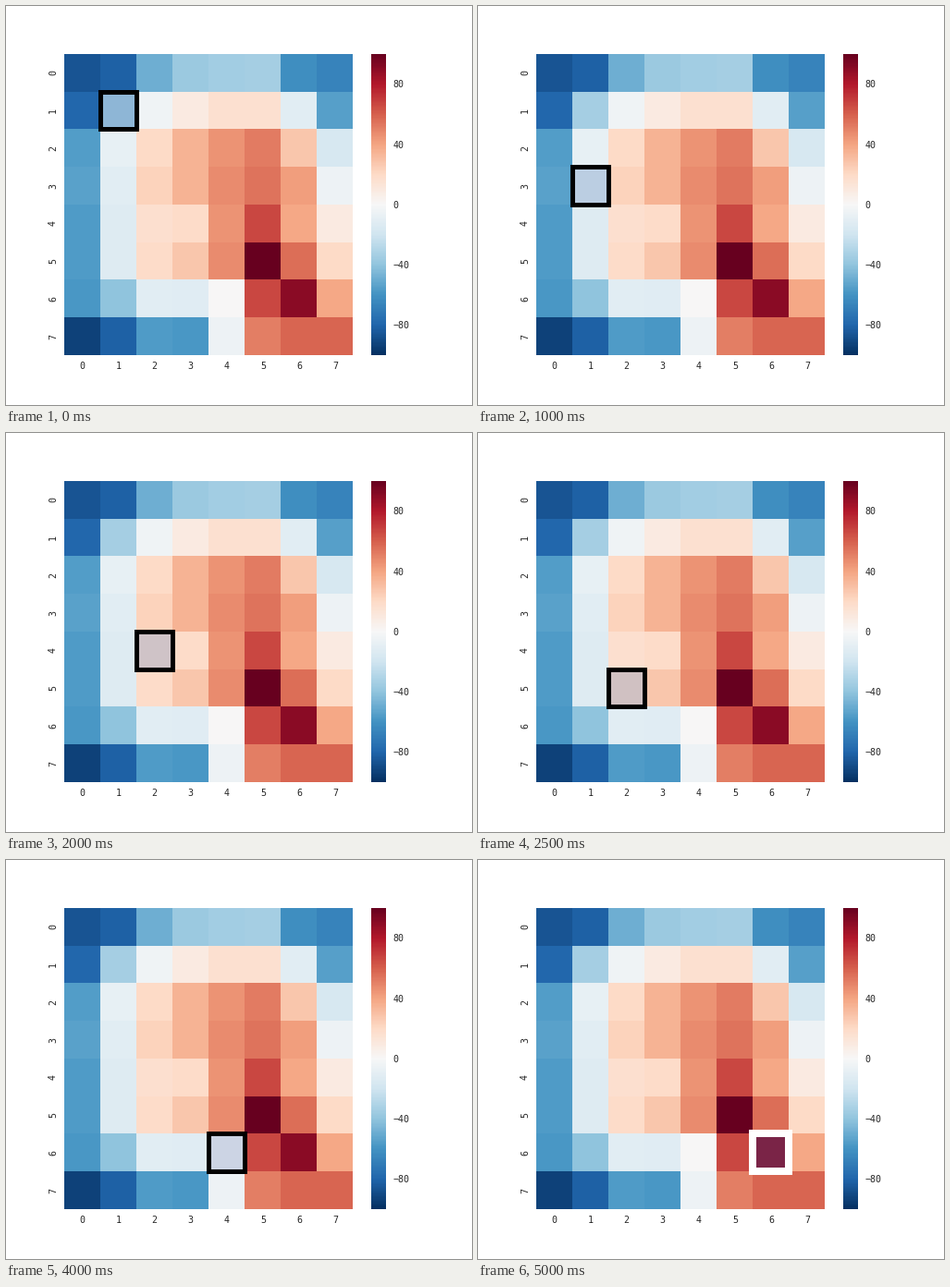
A matplotlib script that plays this animation: 504x432 px, repeating every 5500 ms.

```python
import matplotlib.pyplot as plt
import numpy as np
from matplotlib.animation import FuncAnimation
from matplotlib.patches import Rectangle

plt.rcParams.update({
    "font.family": "DejaVu Sans Mono",
    "font.size": 10,
    "text.color": "0.15",
    "xtick.color": "0.15",
    "ytick.color": "0.15",
})

GRID = np.array([
    [-86, -82, -49, -37, -35, -34, -62, -67],
    [-79, -34, -4, 9, 16, 16, -11, -55],
    [-56, -8, 20, 35, 45, 52, 28, -17],
    [-54, -11, 23, 35, 47, 54, 42, -5],
    [-57, -13, 17, 19, 45, 67, 39, 9],
    [-57, -13, 19, 28, 47, 100, 56, 20],
    [-58, -40, -11, -12, 0, 67, 90, 39],
    [-93, -82, -57, -58, -5, 51, 58, 58],
])
N = len(GRID)

# Walk from (1, 1) to the goal at (6, 6): D steps down, R steps right
START = (1, 1)
STEPS = "DDRDDRDRRR"
PATH = [START]
for step in STEPS:
    row, col = PATH[-1]
    PATH.append((row + (step == "D"), col + (step == "R")))

FILL = (76 / 255, 114 / 255, 176 / 255, 0.25)

fig = plt.figure(figsize=(7, 6), dpi=72, facecolor="white")
left, bottom, width, top = 0.125, 0.125, 0.775, 0.88
height = top - bottom
ax = fig.add_axes([left, bottom, width * 0.8, height])
cax = fig.add_axes([left + width * 0.85, bottom, height * 6 / 20 / 7, height])

mesh = ax.pcolormesh(GRID, cmap="RdBu_r", vmin=-100, vmax=100)
ax.set(xlim=(0, N), ylim=(N, 0))
ax.set_xticks(np.arange(N) + 0.5, range(N))
ax.set_yticks(np.arange(N) + 0.5, range(N), rotation=90, va="center")
ax.tick_params(length=0, pad=7)
ax.spines[:].set_visible(False)

bar = fig.colorbar(mesh, cax=cax, ticks=range(-80, 81, 40))
bar.outline.set_visible(False)
cax.tick_params(length=0, pad=7)

marker = ax.add_patch(Rectangle((0, 0), 1, 1, facecolor=FILL, clip_on=False,
                                joinstyle="miter", zorder=3))


def update(i):
    row, col = PATH[i]
    at_goal = i == len(PATH) - 1
    marker.set_xy((col, row))
    marker.set_edgecolor("white" if at_goal else "black")
    marker.set_linewidth(8 if at_goal else 5)
    return (marker,)


anim = FuncAnimation(fig, update, frames=len(PATH), interval=500,
                     repeat=True, repeat_delay=0)
plt.show()
```
